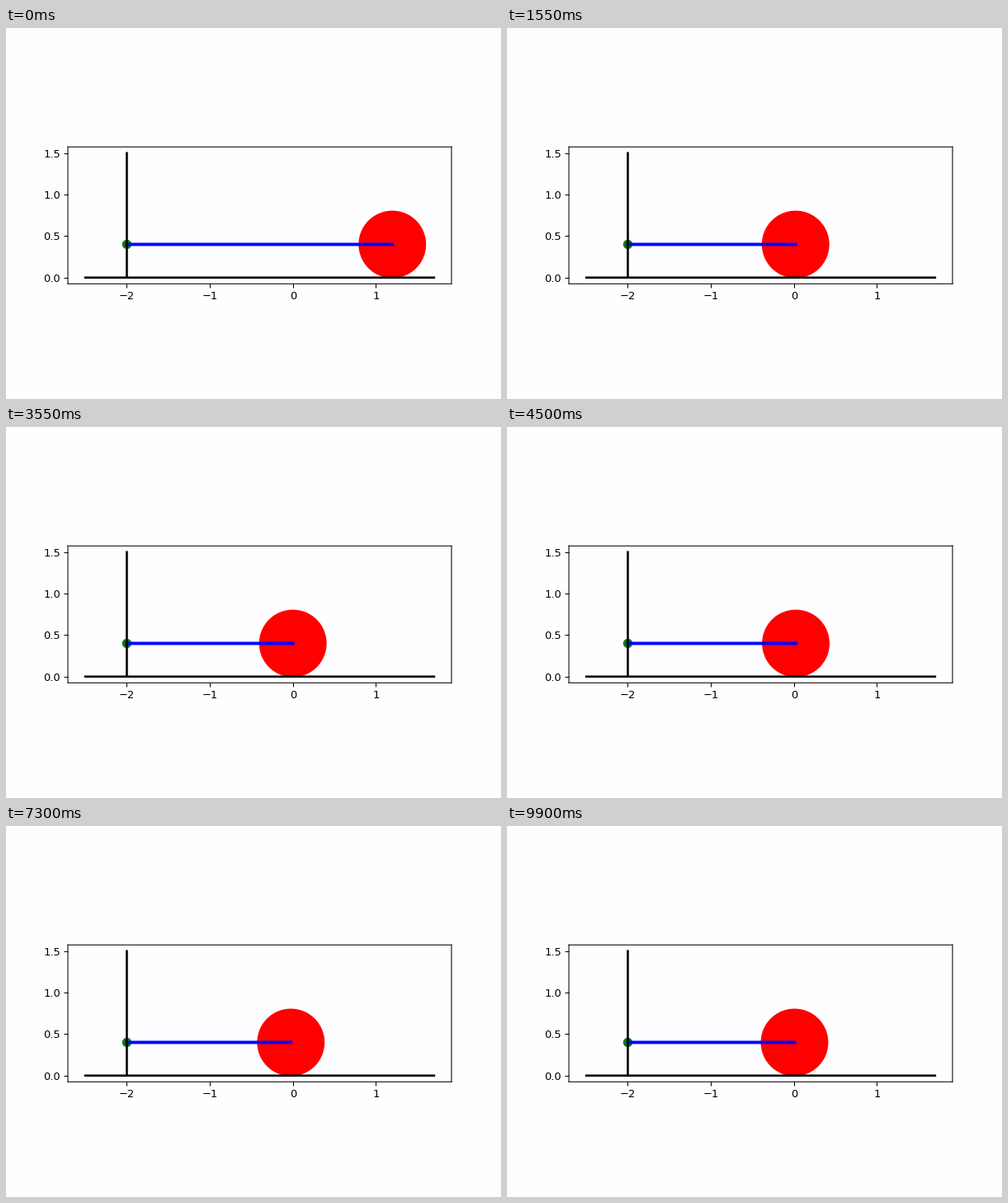
Write a matplotlib script that moves like this. It is 600 by 450 pixels and loops after 9.95 s.

```python
import numpy as np
import matplotlib.pyplot as plt
from matplotlib.animation import FuncAnimation
from matplotlib.patches import Circle

FRAMES, INTERVAL = 199, 50
WALL_X, RADIUS = -2.0, 0.4
START, DAMPING, OMEGA = 1.2, 0.495, 3.1225
LEAD = 0.42  # part of a step already elapsed at the first frame

plt.rcParams["font.family"] = "DejaVu Sans"
PAPER = "#fefdff"

fig = plt.figure(figsize=(6.4, 4.8), dpi=93.75, facecolor=PAPER)
ax = fig.add_axes([0.125, 0.11, 0.775, 0.77], facecolor=PAPER)
ax.set_aspect("equal")
ax.set_xlim(-2.71, 1.91)
ax.set_ylim(-0.075, 1.575)
ax.set_xticks([-2, -1, 0, 1])
ax.set_yticks([0, 0.5, 1, 1.5])
for spine in ax.spines.values():
    spine.set_snap(False)


def bar(xs, ys, color, width):
    line, = ax.plot(xs, ys, color=color, lw=width, snap=False)
    return line


ax.add_patch(Circle((WALL_X, RADIUS), 0.05, color="g"))
wheel = ax.add_patch(Circle((START, RADIUS), RADIUS, color="r"))

# the wall is drawn over the end of the rod
rod = bar([WALL_X, START], [RADIUS, RADIUS], "b", 3)
bar([-2.5, 1.7], [0, 0], "k", 2)
bar([WALL_X, WALL_X], [0, 1.5], "k", 2)


def position(t):
    """Damped oscillation of the wheel, released from rest."""
    swing = np.cos(OMEGA * t) + DAMPING / OMEGA * np.sin(OMEGA * t)
    return START * np.exp(-DAMPING * t) * swing


def update(frame):
    x = position((frame + LEAD) * INTERVAL / 1000)
    wheel.center = (x, RADIUS)
    rod.set_xdata([WALL_X, x])
    return wheel, rod


anim = FuncAnimation(fig, update, frames=FRAMES, interval=INTERVAL,
                     repeat=True, repeat_delay=0, blit=False)
plt.show()
```
